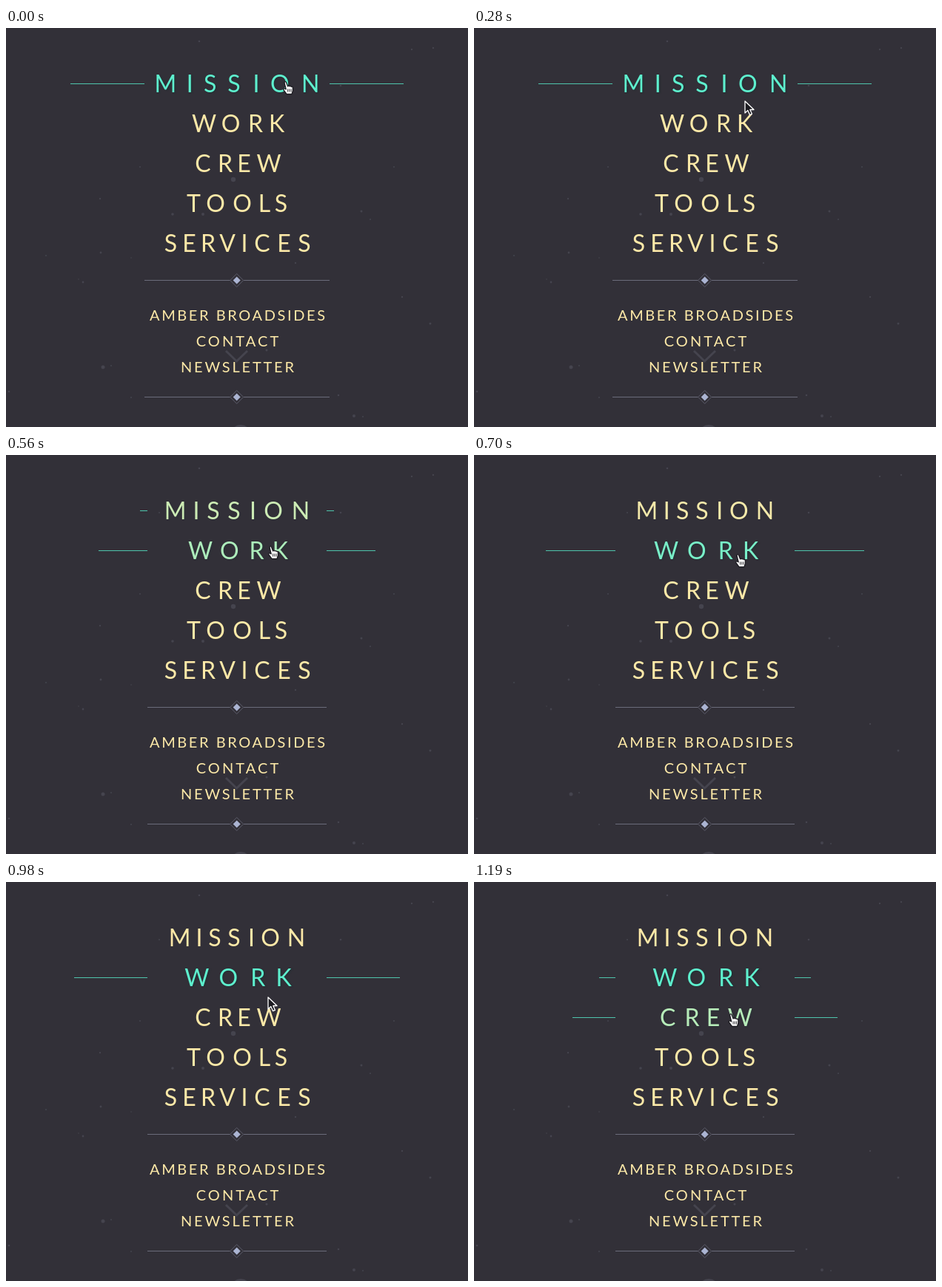
Animation, 624 px wide and 540 px high, one loop 1260 ms. Source, as an HTML page with a canvas:

```html
<!DOCTYPE html>
<html lang="en">
<head>
<meta charset="utf-8">
<title>Menu</title>
<style>
  html, body { margin: 0; width: 100%; height: 100%; overflow: hidden; background: #323038; }
  canvas { display: block; }
</style>
</head>
<body>
<canvas id="stage" width="624" height="540"></canvas>
<script>
const ctx = document.getElementById('stage').getContext('2d');
const LOOP = 1260, STEP = 70, MID = 312, NEVER = 9999;
const CREAM = [253, 233, 168], TEAL = [94, 240, 206];

// Letter centres at rest; hover times in ms
const items = [
  { word: 'MISSION', at: [234.5, 261, 282, 308, 331.5, 357, 392], on: -999, off: 280, textOff: 280 },
  { word: 'WORK', at: [267.5, 303.5, 337, 365.5], on: 386, off: 975, textOff: 1190 },
  { word: 'CREW', at: [266, 296, 321.5, 355], on: 1038, off: NEVER, textOff: NEVER },
  { word: 'TOOLS', at: [253.5, 283, 319, 349, 371.5], on: NEVER, off: NEVER, textOff: NEVER },
  { word: 'SERVICES', at: [222.5, 247.5, 273, 299, 322, 346, 375.5, 403], on: NEVER, off: NEVER, textOff: NEVER }
];
const links = [['AMBER BROADSIDES', 2.6], ['CONTACT', 3.1], ['NEWSLETTER', 2.8]];

// x, y, radius
const dust = [
  [307, 205, 3.2], [131, 459, 2.5], [480, 248, 1.5], [127, 231, 1.2], [225, 252, 1.8], [266, 252, 2],
  [128, 304, 1.4], [104, 344, 1.4], [98, 340, .8], [169, 311, .8], [54, 308, 1], [181, 188, 1],
  [524, 188, 1], [573, 400, 1.5], [535, 364, 1.2], [391, 318, 1.2], [352, 436, 1.5], [470, 525, 2],
  [482, 526, 1], [449, 497, 1.3], [4, 492, 1.3], [142, 457, 1], [169, 500, 1], [261, 18, 1.3],
  [548, 29, 1.2], [577, 27, 1.2], [452, 78, 1.3], [207, 78, 1], [492, 259, 1]
];

// time, x, y of the pointer tip
const route = [
  [0, 378, 73], [280, 366, 99], [420, 362, 114], [560, 358, 124],
  [700, 357, 135], [980, 354, 156], [1190, 347.5, 179], [1260, 345, 186]
];

const clamp = v => Math.min(1, Math.max(0, v));
const mix = (a, b, p) => a + (b - a) * p;

// cubic-bezier(.25, .1, .25, 1)
function ease(x) {
  x = clamp(x);
  const curve = (a, b, u) => 3 * a * u * (1 - u) ** 2 + 3 * b * u * u * (1 - u) + u ** 3;
  let lo = 0, hi = 1;
  for (let i = 0; i < 20; i++) {
    const u = (lo + hi) / 2;
    if (curve(.25, .25, u) < x) lo = u; else hi = u;
  }
  return curve(.1, 1, lo);
}
const relax = x => 1 - (1 - clamp(x)) ** 1.3;

function pointerAt(t) {
  const i = route.findIndex(k => k[0] > t);
  const [t0, x0, y0] = route[i - 1], [t1, x1, y1] = route[i];
  const p = (t - t0) / (t1 - t0);
  return [mix(x0, x1, p), mix(y0, y1, p)];
}

function backdrop() {
  ctx.fillStyle = '#323038';
  ctx.fillRect(0, 0, 624, 540);
  ctx.fillStyle = '#45444e';
  for (const [x, y, r] of dust) {
    ctx.beginPath();
    ctx.arc(x, y, r, 0, 7);
    ctx.fill();
  }
  ctx.beginPath();
  ctx.arc(317, 551, 14, 0, 7);
  ctx.fill();
  ctx.strokeStyle = '#45444e';
  ctx.lineWidth = 3;
  ctx.stroke(new Path2D('M297 437L311.5 451L326 437'));
}

function diamond(x, y, r) {
  ctx.beginPath();
  ctx.moveTo(x, y - r);
  ctx.lineTo(x + r, y);
  ctx.lineTo(x, y + r);
  ctx.lineTo(x - r, y);
  ctx.closePath();
}

function divider(y, half) {
  ctx.fillStyle = '#6b6c7b';
  ctx.fillRect(MID - half, y, half - 9, 1);
  ctx.fillRect(MID + 9, y, half - 9, 1);
  diamond(311.7, y + .5, 9);
  ctx.strokeStyle = '#5b5b68';
  ctx.lineWidth = 1;
  ctx.stroke();
  diamond(311.7, y + .5, 5);
  ctx.fillStyle = '#abb4d2';
  ctx.fill();
}

function menuItem(item, row, t, half) {
  const { word, at, on, off } = item;
  const len = Math.round(100 * (ease((t - on) / 450) - ease((t - off) / 450)));
  ctx.fillStyle = '#4fc5ad';
  ctx.fillRect(Math.round(MID - half) - len, 75 + 54 * row, len, 1);
  ctx.fillRect(Math.round(MID + half), 75 + 54 * row, len, 1);

  ctx.font = '32px Lato, sans-serif';
  ctx.textAlign = 'center';
  ctx.letterSpacing = '0px';
  ctx.fillStyle = `rgb(${CREAM.map((c, i) => mix(c, TEAL[i], item.glow))})`;
  ctx.shadowColor = `rgba(20, 50, 50, ${.5 * item.glow})`;
  ctx.shadowOffsetX = ctx.shadowOffsetY = 1.5;
  ctx.shadowBlur = 2;
  at.forEach((x, i) =>
    ctx.fillText(word[i], x + 6.4 * item.glow * (i - (word.length - 1) / 2), 86.5 + 54 * row));
  ctx.shadowColor = 'transparent';
}

function link([text, gap], row) {
  ctx.font = '20px Lato, sans-serif';
  ctx.textAlign = 'center';
  ctx.letterSpacing = gap + 'px';
  ctx.fillStyle = `rgb(${CREAM})`;
  ctx.fillText(text, 312.5 + gap / 2, 396 + 35 * row);
}

const arrow = new Path2D('M0 0V16L3.8 12.5L6.5 18.6L9.4 17.3L6.8 11.5H12Z');
const hand = new Path2D('M-2 1Q-1.5-1 .3 0L2.6 6Q4 4.4 5 6Q6.6 5 7.4 6.6Q9.2 6 9.4 8V12L8 16.5H1L-3 11Q-4 8.5-1.6 9L.2 10Z');
const knuckles = new Path2D('M2.6 9.5V13.5M4.8 9.5V13.5M7 9.5V13.5');

function pointer(t) {
  const [x, y] = pointerAt(t);
  const between = (y - 98 + 54) % 54 < 11;
  ctx.save();
  ctx.translate(x, y);
  ctx.lineJoin = 'round';
  ctx.lineWidth = 1.3;
  ctx.fillStyle = between ? '#1b1a20' : '#fff';
  ctx.strokeStyle = between ? '#fff' : '#1b1a20';
  const shape = between ? arrow : hand;
  ctx.fill(shape);
  ctx.stroke(shape);
  if (!between) {
    ctx.lineWidth = .9;
    ctx.stroke(knuckles);
  }
  ctx.restore();
}

function draw(now) {
  const t = Math.floor(now % LOOP / STEP) * STEP;
  for (const item of items)
    item.glow = relax((t - item.on) / 420) - relax((t - item.textOff) / 470);
  // The column is as wide as its widest word
  const half = Math.max(242, 205 + 45 * items[0].glow) / 2;

  backdrop();
  items.forEach((item, row) => menuItem(item, row, t, half));
  divider(341, half);
  links.forEach(link);
  divider(499, half);
  pointer(t);
  requestAnimationFrame(draw);
}
requestAnimationFrame(draw);
</script>
</body>
</html>
```
